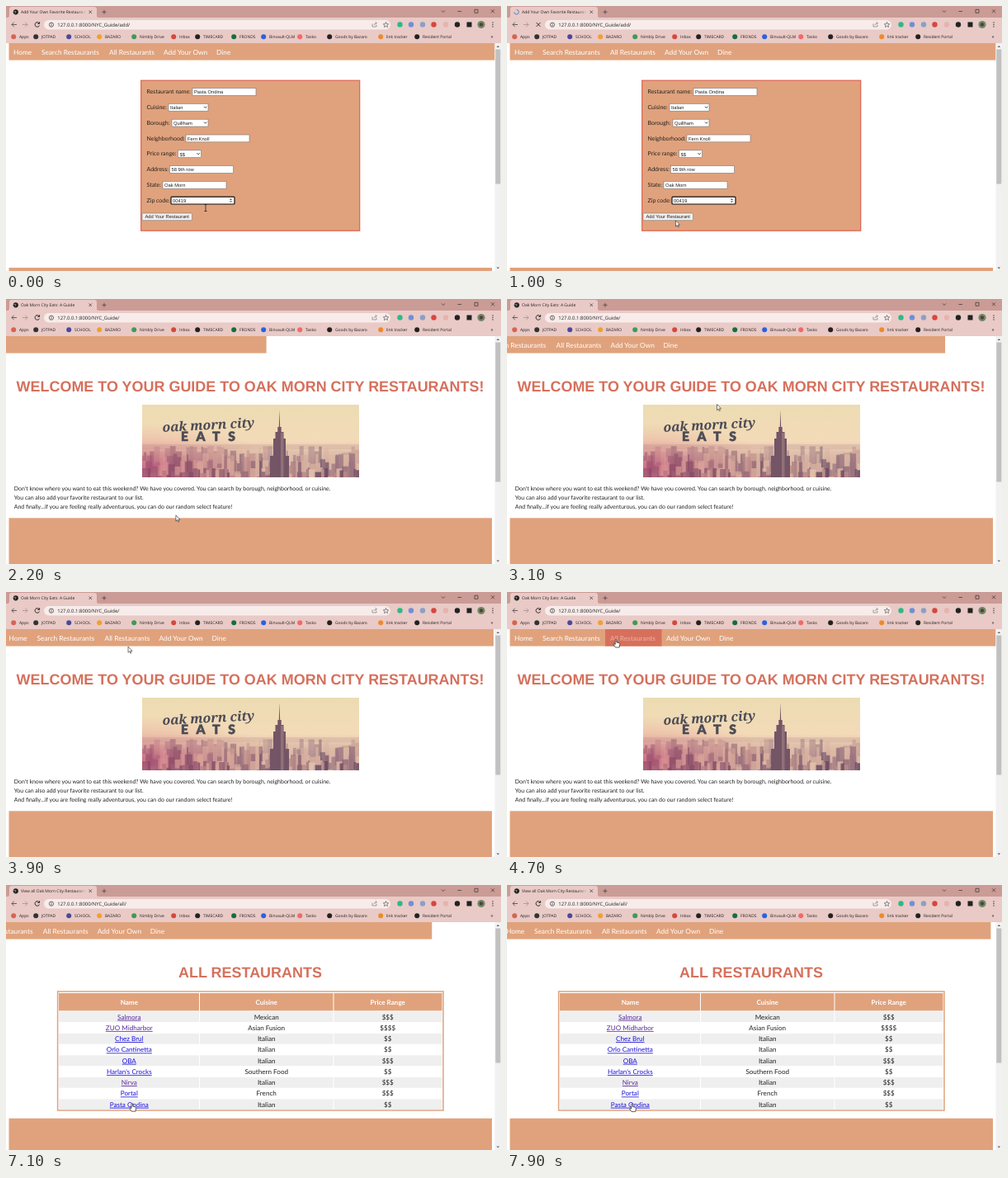
An HTML page for the animation above (8 s loop, 600 by 321 pixels).

```html
<!DOCTYPE html>
<html lang="en">
<head>
<meta charset="utf-8">
<title>Restaurant guide</title>
<style>
  html, body { margin: 0; width: 100%; height: 100%; overflow: hidden; background: #fff; }
  svg { display: block; width: 100vw; height: 100vh; text-rendering: geometricPrecision; }
  .ui { font-family: "Open Sans", sans-serif; }
  .page { font-family: Lato, sans-serif; }
  .field { font-family: "Liberation Sans", Arial, sans-serif; }
  .script { font-family: "Noto Serif", serif; font-style: italic; font-weight: 600; }
</style>
</head>
<body>
<svg id="stage" viewBox="0 0 600 321" preserveAspectRatio="none"></svg>
<script>
const LOOP = 8000, STEP = 100;
const ORANGE = '#e0a27c', RED = '#d6705c', STRIP = '#cb9b96', BAR = '#e9cac6', INK = '#222';

// Drawing helpers: each returns SVG markup.
const rect = (x, y, w, h, fill, extra = '') =>
  `<rect x="${x}" y="${y}" width="${w}" height="${h}" fill="${fill}" ${extra}/>`;
const dot = (x, y, r, fill, extra = '') => `<circle cx="${x}" cy="${y}" r="${r}" fill="${fill}" ${extra}/>`;
const line = (d, color = '#444', width = 0.8) =>
  `<path d="${d}" fill="none" stroke="${color}" stroke-width="${width}"/>`;
const text = (x, y, size, str, cls = 'page', fill = INK, extra = '') =>
  `<text x="${x}" y="${y}" font-size="${size}" class="${cls}" fill="${fill}" ${extra}>${str}</text>`;
const group = (id, body) => `<g id="${id}">${body}</g>`;
const MIDDLE = 'text-anchor="middle"', BOLD = 'font-weight="700"';

function browser() {
  const bookmarks = [
    [16, 'Apps', '#d6654f'], [43, 'JOTPAD', '#333'], [83, 'SCHOOL', '#4a4a9c'], [120, 'BAZARO', '#f0a030'],
    [162, 'Nimbly Drive', '#3f9b55'], [210, 'Inbox', '#d8473a'], [239, 'TIMECARD', '#222'],
    [283, 'FRONDS', '#12703a'], [319, 'Binvault-QLM', '#2a62e0'], [363, 'Tasko', '#f06a6a'],
    [399, 'Goods by Bazaro', '#222'], [461, 'link tracker', '#ee8a2c'], [505, 'Resident Portal', '#222']];
  const tools = [[477.5, '#2fb888'], [491, '#6f8fd8'], [505, '#8aa0c8'], [518.5, '#d9453f'], [533, '#e6b3ae'], [547, '#222']];
  return rect(0, 0, 600, 14, STRIP)
    + `<path d="M2 14Q4 14 4 11V4Q4 1 7 1H107Q110 1 110 4V11Q110 14 112 14Z" fill="${BAR}"/>`
    + rect(0, 14, 600, 31, BAR)
    + group('globe', dot(11.8, 7.3, 3.1, '#222') + line('M9.3 6.5H12L11 9', '#bbb', 0.6))
    + group('spinner', line('M11.5 4.5A2.8 2.8 0 1 1 8.7 7.3', '#4a78c8', 0.9))
    + text(18, 9.2, 5, '', 'ui', INK, 'id="title"')
    + rect(87, 3, 10, 9, 'url(#fade)') + rect(97, 3, 11, 9, BAR)
    + line('M100.5 5.5L104 9M104 5.5L100.5 9M116.5 7.3H121.5M119 4.8V9.8')
    + line('M528 5.5L530 7.5L532 5.5M547.5 6.5H552M568 4.3H572V8.3H568ZM588 4.3L592 8.3M592 4.3L588 8.3', '#333', 0.7)
    + line('M13 22.5H7M9.7 19.7L7 22.5L9.7 25.3') + line('M20 22.5H26M23.3 19.7L26 22.5L23.3 25.3', '#a58f8c')
    + group('reload', line('M40.3 21A2.8 2.8 0 1 0 40.5 23.6M40.6 19.3V21.4H38.4', '#222', 1))
    + group('stop', line('M35.5 20L40.5 25M40.5 20L35.5 25', '#222', 0.9))
    + rect(46, 17, 420, 11.5, '#f7ecea', 'rx="5.7"')
    + dot(55, 22.7, 2.6, 'none', 'stroke="#444" stroke-width=".8"') + line('M55 22.2V24.2M55 21V21.6', '#444', 0.8)
    + text(62.3, 24.8, 5.95, '', 'ui', INK, 'id="url"')
    + line('M444 21.5V25H449V23M446 23Q446.5 20.8 449 20.8M447.8 19.2L449.5 20.8L447.8 22.4', '#666', 0.6)
    + line('M460.5 19.5L461.4 21.7L463.7 21.9L462 23.4L462.5 25.6L460.5 24.4L458.5 25.6L459 23.4L457.3 21.9L459.6 21.7Z', '#555', 0.7)
    + tools.map(([x, c]) => dot(x, 22.5, 3.2, c)).join('')
    + rect(558.5, 19.5, 6, 6, '#222') + dot(576, 22.5, 4.6, '#6f8a68') + dot(576, 22.5, 2.2, '#54413c')
    + [20, 22.5, 25].map(y => dot(590, y, 0.7, '#333')).join('')
    + bookmarks.map(([x, s, c]) => dot(x - 6.8, 37.2, 3, c) + text(x, 39, 4.95, s, 'ui')).join('')
    + text(587.5, 39, 6, '»', 'ui');
}

const footer = y => rect(3.5, y, 585.5, 321 - y, ORANGE);
const heading = (y, s) => text(296, y, 17.97, s, 'field', RED, `${MIDDLE} ${BOLD}`);

function formPage() {
  const rows = [
    ['Restaurant name:', 226, 77, 'Pasta Ondina'], ['Cuisine:', 197, 48, 'Italian', 'v'], ['Borough:', 201, 44, 'Quillham', 'v'],
    ['Neighborhood:', 218, 77, 'Fern Knoll'], ['Price range:', 208.5, 28, '$$', 'v'], ['Address:', 198.5, 77, '58 9th row'],
    ['State:', 190, 77, 'Oak Morn'], ['Zip code:', 200, 77, '00419', 'n']];
  return rect(163.7, 90.2, 265, 182, ORANGE, 'stroke="#dc6250" stroke-width="1.2"')
    + rows.map(([label, x, w, value, kind], i) => {
      const y = 106.2 + i * 18.8, end = x + w;
      const ring = kind === 'n' ? 'stroke="#111" stroke-width="1.2" rx="1"' : 'stroke="#777" stroke-width=".6"';
      return text(170.5, y, 7, label) + rect(x, y - 6.6, w, 8.8, '#fff', ring)
        + text(x + 2, y + 0.1, 5.8, value, 'field')
        + (kind === 'v' ? line(`M${end - 5} ${y - 3.2}l1.6 1.6l1.6 -1.6`, '#222', 0.9) : '')
        + (kind === 'n' ? `<path d="M${end - 6} ${y - 2.8}h3l-1.5 -1.9zm0 1.2h3l-1.5 1.9z" fill="#555"/>` : '');
    }).join('')
    + rect(165, 251, 60.5, 8.7, '#f0f0f0', 'stroke="#777" stroke-width=".6" rx="1"')
    + text(195.2, 257.4, 5.8, 'Add Your Restaurant', 'field', INK, MIDDLE)
    + footer(317);
}

function banner() {
  let seed = 7, city = '';
  const random = () => (seed = seed * 16807 % 2147483647) / 2147483647;
  const shades = ['#d8b0a0', '#8a6474', '#b98a88', '#6a4a62', '#e3c0a8', '#9a7480'];
  for (let layer = 0; layer < 4; layer++)
    for (let x = 165; x < 428;) {
      const w = Math.min(2 + random() * 6, 428 - x), top = 178 + layer * 9 + random() ** 2 * 14;
      const shade = shades[Math.floor(random() * shades.length)];
      city += rect(x, top, w, 216 - top, shade, `opacity="${0.45 + layer * 0.13}"`);
      x += w;
    }
  return rect(165, 128, 263, 88, 'url(#sky)') + rect(165, 176, 263, 6, '#d9b5a5', 'opacity=".6"') + city
    + '<path d="M320 216V190H324V169H326.5V161H329.3V155H330.8L331.5 134L332.2 155H333.7V161H336.5V169H339V190H343V216Z" fill="#735566"/>'
    + rect(333, 162, 3.5, 54, '#a58283', 'opacity=".6"')
    + rect(165, 128, 263, 88, 'url(#glow)')
    + text(245.5, 158, 15.8, 'oak morn city', 'script', '#4b4b55', `${MIDDLE} transform="rotate(-3 246 156)"`)
    + text(212, 171.5, 15.6, 'EATS', 'page', '#4b4b55', 'font-weight="900" letter-spacing="9.6" stroke="#4b4b55" stroke-width=".5"');
}

const homePage = () => heading(112, 'WELCOME TO YOUR GUIDE TO OAK MORN CITY RESTAURANTS!') + banner()
  + ["Don't know where you want to eat this weekend? We have you covered. You can search by borough, neighborhood, or cuisine.",
    'You can also add your favorite restaurant to our list.',
    'And finally...if you are feeling really adventurous, you can do our random select feature!']
    .map((s, i) => text(9.7, 232 + i * 11.1, 6.98, s)).join('')
  + footer(265.3);

function allPage() {
  const rows = [
    ['Salmora', 'Mexican', '$$$', 1], ['ZUO Midharbor', 'Asian Fusion', '$$$$', 1], ['Chez Brul', 'Italian', '$$'],
    ['Orlo Cantinetta', 'Italian', '$$'], ['OBA', 'Italian', '$$$'], ["Harlan's Crocks", 'Southern Food', '$$'],
    ['Nirva', 'Italian', '$$$', 1], ['Portal', 'French', '$$$'], ['Pasta Ondina', 'Italian', '$$']];
  const columns = [[64, 170, 149.3], [235, 161.5, 315.7], [397.5, 131, 462.7]];
  return heading(112, 'ALL RESTAURANTS')
    + rect(62.6, 129, 467.4, 144, '#fff', `stroke="${ORANGE}" stroke-width="1.5"`)
    + columns.map(([x, w, mid], c) => rect(x, 131, w, 21.3, ORANGE)
      + text(mid, 144.7, 8.1, ['Name', 'Cuisine', 'Price Range'][c], 'page', '#fff', `${MIDDLE} ${BOLD}`)
      + rows.map((row, r) => rect(x, 153.3 + r * 13.25, w, 12.8, r % 2 ? '#fff' : '#efeff0')
        + text(mid, 162.7 + r * 13.25, 8.1, row[c], 'page', c ? INK : row[3] ? '#5a2a98' : '#1a10d8',
          MIDDLE + (c ? '' : ' text-decoration="underline"'))).join('')).join('')
    + footer(282.7);
}

function nav() {
  const item = (x, s) => text(x, 58.6, 8.35, s, 'page', '#fff');
  return rect(3.5, 45, 593, 20.6, ORANGE)
    + item(9, 'Home') + item(43, 'Search Restaurants')
    + group('allLink', item(125, 'All Restaurants'))
    + group('allHover', rect(119, 45, 68.5, 20.6, RED) + text(125, 58.6, 8.2, 'All Restaurants', 'page', '#e8a392', BOLD))
    + group('navRest', item(191, 'Add Your Own') + item(255, 'Dine'));
}

const scrollbar = rect(592.5, 45, 7.5, 276, '#f1f1f1') + rect(593.3, 52.5, 6, 169, '#c1c1c1', 'id="thumb"')
  + '<path d="M594.5 50l1.8 -2l1.8 2zM594.5 316.5l1.8 2l1.8 -2z" fill="#666"/>';

const pointers = group('ibeam', line('M-1.6 -4H1.6M0 -4V4M-1.6 4H1.6', '#222', 0.8))
  + group('arrow', '<path d="M0 0V7.2L1.7 5.7L2.8 8.1L3.9 7.6L2.8 5.3H5Z" fill="#fff" stroke="#222" stroke-width=".6"/>')
  + group('hand', '<path d="M-.8 .4Q0 -.6 .8 .4V3.5L4 4.3Q5 4.6 4.8 6L4.2 9.6H-.6L-3 6Q-2.6 4.8 -.8 6Z" fill="#fff" stroke="#222" stroke-width=".7"/>');

const stage = document.getElementById('stage');
stage.innerHTML = `<defs>
  <linearGradient id="fade"><stop stop-color="${BAR}" stop-opacity="0"/><stop offset="1" stop-color="${BAR}"/></linearGradient>
  <linearGradient id="sky" x2="0" y2="1"><stop stop-color="#ecdcb2"/><stop offset=".5" stop-color="#f3dab8"/><stop offset="1" stop-color="#b58c92"/></linearGradient>
  <radialGradient id="glow" cx="0" cy=".85" r=".6"><stop stop-color="#c23a70" stop-opacity=".5"/><stop offset="1" stop-color="#e08a80" stop-opacity="0"/></radialGradient>
  <clipPath id="view">${rect(0, 45, 592.5, 276, '#000')}</clipPath></defs>`
  + rect(0, 0, 600, 321, '#fff')
  + group('add', formPage()) + group('home', homePage()) + group('all', allPage())
  + `<g clip-path="url(#view)">${group('nav', nav())}</g>` + scrollbar + browser() + group('cursor', pointers);

const el = {};
stage.querySelectorAll('[id]').forEach(node => el[node.id] = node);
const show = (id, on) => el[id].setAttribute('display', on ? 'inline' : 'none');
const move = (id, x, y = 0) => el[id].setAttribute('transform', `translate(${x} ${y})`);

const pages = [
  { id: 'add', from: 0, slide: -3000, span: 3000, path: 'add/', title: 'Add Your Own Favorite Restaurant', thumb: 163 },
  { id: 'home', from: 1200, titled: 1500, slide: 1280, span: 3000, path: '', title: 'Oak Morn City Eats: A Guide', thumb: 169 },
  { id: 'all', from: 5000, titled: 5200, slide: 5340, span: 3080, path: 'all/', title: 'View all Oak Morn City Restaurants', thumb: 163 }];

const cursorPath = [[0, 242, 244.5], [400, 203, 257], [1300, 205, 260.8], [2400, 206, 262], [3100, 254.5, 127.5],
  [3300, 240, 110], [4100, 131, 58], [4700, 132, 57.5], [5000, 134, 60], [5700, 258, 133.5], [6000, 258, 134],
  [6800, 153, 264.5], [8000, 151.5, 265]];

// The CSS "ease" curve: cubic-bezier(.25, .1, .25, 1).
function ease(x) {
  if (x <= 0 || x >= 1) return x <= 0 ? 0 : 1;
  const bezier = (s, a, b) => 3 * a * s * (1 - s) ** 2 + 3 * b * s * s * (1 - s) + s ** 3;
  let low = 0, high = 1;
  for (let i = 0; i < 24; i++) {
    const mid = (low + high) / 2;
    if (bezier(mid, 0.25, 0.25) < x) low = mid; else high = mid;
  }
  return bezier(low, 0.1, 1);
}

function cursorAt(t) {
  const i = cursorPath.findIndex((key, n) => n && key[0] >= t);
  const [t0, x0, y0] = cursorPath[i - 1], [t1, x1, y1] = cursorPath[i];
  const k = (t - t0) / (t1 - t0), s = k * k * (3 - 2 * k);
  return [x0 + (x1 - x0) * s, y0 + (y1 - y0) * s];
}

function render(t) {
  const page = pages.filter(p => p.from <= t).pop();
  for (const p of pages) show(p.id, p === page);
  const address = '127.0.0.1:8000/NYC_Guide/' + page.path;
  el.url.textContent = address;
  el.title.textContent = t < page.titled ? address : page.title;
  el.thumb.setAttribute('height', page.thumb);

  const loading = (t >= 600 && t < 1500) || (t >= 4800 && t < 5200);
  show('spinner', loading);
  show('globe', !loading);
  show('stop', loading);
  show('reload', !loading);
  el.spinner.setAttribute('transform', `rotate(${t * 0.36} 11.5 7.3)`);

  const progress = (t - page.slide) / page.span;
  move('nav', -593 * (1 - ease(progress)));
  show('nav', progress > 0.02);
  const hover = t >= 4100 && t < 5000;
  show('allHover', hover);
  show('allLink', !hover);
  move('navRest', hover ? 2 : 0);

  const pointer = t < 200 ? 'ibeam' : hover || t >= 6700 ? 'hand' : 'arrow';
  for (const id of ['ibeam', 'arrow', 'hand']) show(id, id === pointer);
  move('cursor', ...cursorAt(t));
}

const start = performance.now();
function frame() {
  const t = (performance.now() - start) % LOOP;
  render(Math.floor(t / STEP) * STEP);
  requestAnimationFrame(frame);
}
frame();
</script>
</body>
</html>
```
